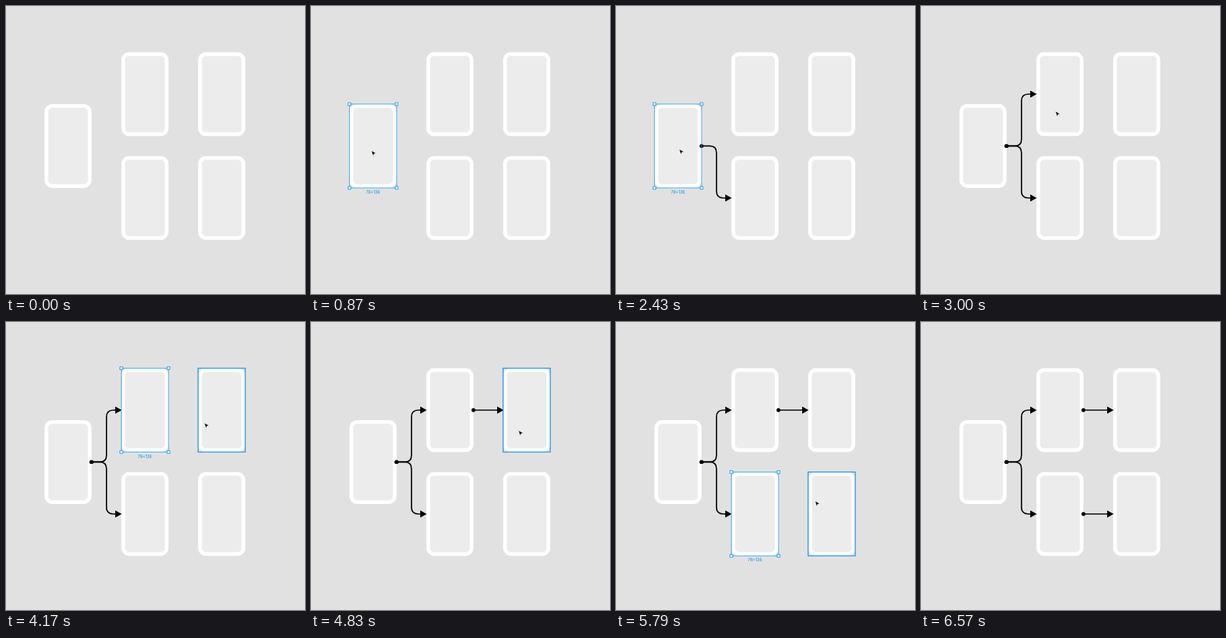
An HTML page that plays this animation: 416x402 px, repeating every 7.83 s.

```html
<!DOCTYPE html>
<html lang="en">
<head>
<meta charset="utf-8">
<title>Connecting screens</title>
<style>
html, body { margin: 0; width: 100%; height: 100%; overflow: hidden; background: #e1e1e1; }
svg { display: block; width: 416px; height: 402px; }
.card { fill: #ececec; stroke: #fff; stroke-width: 5.2; }
.wire { fill: none; stroke: #000; stroke-width: 1.7; }
.hover { fill: none; stroke: #1c98ec; stroke-width: 1.3; }
.frame { fill: none; stroke: #2ea6ee; stroke-width: .9; }
.handle { fill: #fff; stroke: #1c9cf0; stroke-width: .9; }
.size { fill: #1c9cf0; font: 500 5.5px Inter, Roboto, sans-serif; text-anchor: middle; }
.cursor { fill: #000; stroke: #fff; stroke-width: .5; }
</style>
</head>
<body>
<svg id="stage" viewBox="0 0 416 402"></svg>
<script>
const LOOP = 7830, STEP = 30, W = 65.6, H = 117;
const stage = document.getElementById('stage');

const cards = {
  a: [53.5, 136.9], b: [160.5, 64.5], c: [160.5, 209.4],
  d: [267.3, 64.5], e: [267.3, 209.4]
};

// start, end, card
const selections = [
  [780, 1530, 'a'], [2130, 2790, 'a'], [3570, 4530, 'b'],
  [5130, 5970, 'c']
];

// time, x, y, easing used to arrive
const path = [
  [180, 44, 385, 'hold'], [750, 84, 202, 'both'],
  [1260, 84, 202, 'hold'], [1500, 186, 262, 'both'],
  [1800, 186, 262, 'hold'], [1830, 158, 249, 'line'], [2130, 88, 200, 'out'],
  [2430, 88, 200, 'hold'], [2880, 187, 147, 'both'],
  [3360, 187, 147, 'hold'], [3570, 191, 144, 'both'],
  [3990, 191, 144, 'hold'], [4170, 276, 141, 'in'], [4500, 291, 149, 'out'],
  [4800, 291, 149, 'hold'], [5130, 193, 258, 'both'],
  [5460, 193, 258, 'hold'], [5790, 277, 250, 'in'], [5970, 291, 252, 'out'],
  [6450, 291, 252, 'hold'], [6570, 362, 268, 'line']
];

const ease = {
  hold: p => p,
  line: p => p,
  in: p => p ** 1.6,
  out: p => 1 - (1 - p) ** 2.2,
  both: p => p * p * (3 - 2 * p)
};

function add(parent, tag, attrs, text) {
  const el = document.createElementNS('http://www.w3.org/2000/svg', tag);
  for (const key in attrs) el.setAttribute(key, attrs[key]);
  if (text) el.textContent = text;
  parent.appendChild(el);
  return el;
}

const show = (el, on) => el.style.display = on ? '' : 'none';

function addWire(x, y, d, tipX, tipY, start) {
  const g = add(stage, 'g');
  add(g, 'path', { class: 'wire', d });
  add(g, 'circle', { cx: x, cy: y, r: 2.7 });
  add(g, 'path', { d: `M${tipX} ${tipY}l-9 -5v10z` });
  return { el: g, start };
}

function elbow(toY) {
  const s = Math.sign(toY - 195.4);
  return `M119 195.4H130.5Q139.8 195.4 139.8 ${195.4 + 9.5 * s}` +
    `V${toY - 9.5 * s}Q139.8 ${toY} 149.5 ${toY}H153`;
}

for (const [x, y] of Object.values(cards)) {
  add(stage, 'rect', {
    class: 'card', x: x + 2.6, y: y + 2.6,
    width: W - 5.2, height: H - 5.2, rx: 8
  });
}

const wires = [
  addWire(119, 195.4, elbow(268), 161, 268, 1530),
  addWire(119, 195.4, elbow(123), 161, 123, 2790),
  addWire(226, 123, 'M226 123H260', 268, 123, 4530),
  addWire(226, 268, 'M226 268H260', 268, 268, 5970)
];

const hover = add(stage, 'rect', { class: 'hover', x: 0, y: 0, width: W, height: H });

const selection = add(stage, 'g');
add(selection, 'rect', { class: 'frame', width: W, height: H });
for (const x of [0, W]) {
  for (const y of [0, H]) {
    add(selection, 'rect', { class: 'handle', x: x - 1.9, y: y - 1.9, width: 3.8, height: 3.8 });
  }
}
add(selection, 'text', { class: 'size', x: W / 2, y: H + 8 }, '76×136');

const cursor = add(stage, 'path', { class: 'cursor', d: 'M0 0L6.4 3.4L3.6 4.3L2.3 7.2Z' });

const place = (el, [x, y]) => el.setAttribute('transform', `translate(${x} ${y})`);

function cursorAt(t) {
  const i = path.findIndex(k => k[0] > t);
  if (i < 1) return null;
  const [t0, x0, y0] = path[i - 1], [t1, x1, y1, kind] = path[i];
  const p = ease[kind]((t - t0) / (t1 - t0));
  return [x0 + (x1 - x0) * p, y0 + (y1 - y0) * p];
}

function cardUnder([px, py]) {
  return Object.keys(cards).find(id => {
    const [x, y] = cards[id];
    return px >= x && px <= x + W && py >= y && py <= y + H;
  });
}

function draw(time) {
  const t = Math.floor((time % LOOP) / STEP) * STEP;
  const pos = cursorAt(t);
  const sel = selections.find(s => t >= s[0] && t < s[1]);
  const selected = sel && sel[2];
  const idle = t >= 3000 && t < 3360;
  const over = pos && !idle && cardUnder(pos);
  const hovered = over !== selected && over;

  for (const w of wires) show(w.el, t >= w.start);
  show(cursor, pos);
  if (pos) place(cursor, pos);
  show(hover, hovered);
  if (hovered) place(hover, cards[hovered]);
  show(selection, selected);
  if (selected) place(selection, cards[selected]);
}

const begin = performance.now();
function tick() {
  draw(performance.now() - begin);
  requestAnimationFrame(tick);
}
tick();
</script>
</body>
</html>
```
